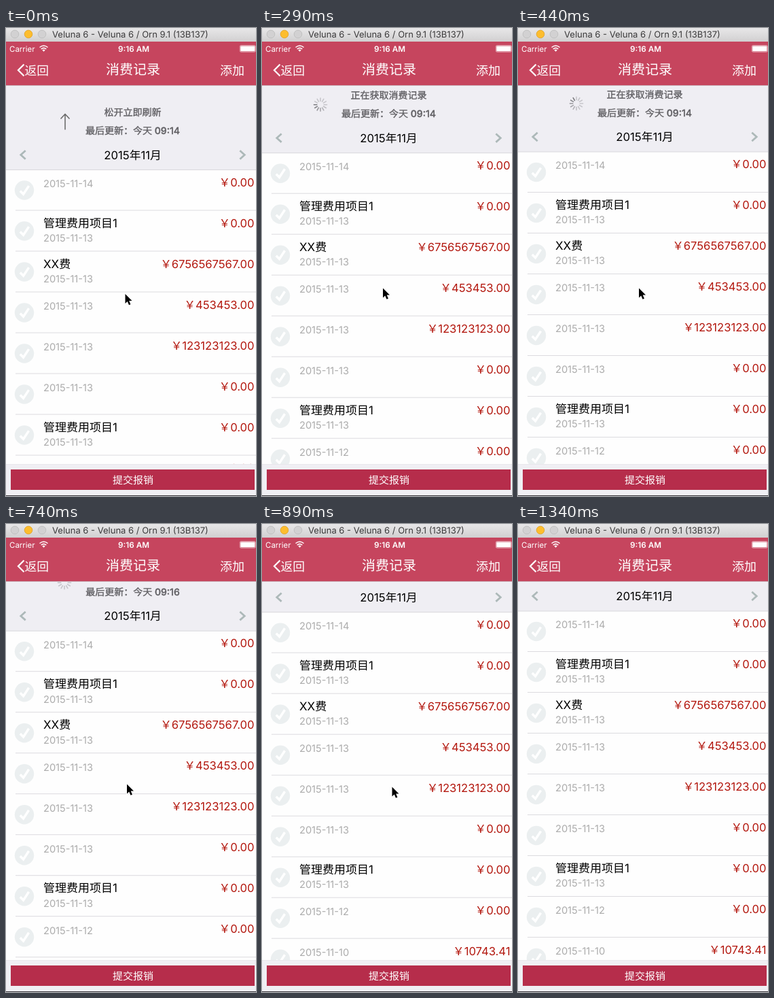
Recreate the animation shown at these times as an HTML page. Size 368 px wide and 688 px high, loop 2350 ms.

```html
<!DOCTYPE html>
<html lang="zh-CN">
<head>
<meta charset="utf-8">
<title>消费记录</title>
<style>
  html, body { margin: 0; width: 100%; height: 100%; overflow: hidden; background: #fff; }
  svg { display: block; width: 100%; height: 100%; }
  text {
    font-family: Inter, "Noto Sans CJK SC", "Noto Sans CJK", sans-serif;
    text-rendering: geometricPrecision;
    white-space: pre;
  }
  .medium { stroke: #5f5e62; stroke-width: .35; }
</style>
</head>
<body>
<svg id="stage" viewBox="0 0 368 688">
  <defs>
    <linearGradient id="chrome" x2="0" y2="1">
      <stop stop-color="#e8e7e8"/><stop offset="1" stop-color="#d1d0d1"/>
    </linearGradient>
    <clipPath id="view"><rect y="84" width="368" height="557"/></clipPath>
  </defs>
  <rect width="368" height="688" fill="#fefefe"/>
  <g clip-path="url(#view)">
    <g id="scroll">
      <rect y="-100" width="368" height="228" fill="#efeef3"/>
      <path d="M0 128H368" stroke="#d8d7dc"/>
      <g fill="none" stroke="#adb9b9" stroke-width="2.8">
        <path d="M28.7 99.8L21.8 106L28.7 112.2M344.3 99.8L351.2 106L344.3 112.2"/>
      </g>
      <path id="arrow" d="M87 69V46M80.5 53L87 46L93.5 53" fill="none" stroke="#666" stroke-width="1.5"/>
      <g id="spinner" transform="translate(86 57)"></g>
    </g>
  </g>
  <g id="bars">
    <rect width="368" height="20" fill="url(#chrome)"/>
    <g stroke-width=".8">
      <circle cx="13" cy="9" r="5.8" fill="#d2d1d2" stroke="#bcbbbc"/>
      <circle cx="33" cy="9" r="5.8" fill="#fdbd2e" stroke="#dfa023"/>
      <circle cx="53" cy="9" r="5.8" fill="#d2d1d2" stroke="#bcbbbc"/>
    </g>
    <rect y="20" width="368" height="64" fill="#c6455e"/>
    <rect y="84" width="368" height="1" fill="#c9a9b3"/>
    <g fill="none" stroke="#fff">
      <path d="M49.5 28.5Q55.5 23.5 61.5 28.5M51.7 31Q55.5 27.8 59.3 31" stroke-width="1.5"/>
      <path d="M26.5 53.5L18 62L26.5 70.5" stroke-width="2.3"/>
      <rect x="344.3" y="25.6" width="23" height="9.6" rx="1.8" stroke-width=".7" opacity=".8"/>
    </g>
    <path d="M53.3 32.4Q55.5 30.6 57.7 32.4L55.5 34.8Z" fill="#fff"/>
    <rect x="345.2" y="26.5" width="21.2" height="7.8" rx="1" fill="#fff"/>
    <rect y="641" width="368" height="47" fill="#f0eff4"/>
    <path d="M0 641.5H368" stroke="#e8e7ec"/>
    <rect x="7" y="649" width="359" height="30" fill="#b62d4b"/>
    <rect y="687" width="368" height="1" fill="#3b383d"/>
  </g>
  <path id="cursor" d="M0 0V14L3.2 11L5.5 16.3L7.9 15.2L5.7 10.1H10Z"
    fill="#000" stroke="#fff" stroke-width="1.8" paint-order="stroke"/>
</svg>
<script>
const byId = id => document.getElementById(id);
const scroll = byId('scroll'), bars = byId('bars'), spinner = byId('spinner');
const arrow = byId('arrow'), cursor = byId('cursor');

function add(parent, tag, attrs) {
  const node = document.createElementNS('http://www.w3.org/2000/svg', tag);
  for (const key in attrs) node.setAttribute(key, attrs[key]);
  return parent.appendChild(node);
}

// Places text by the vertical middle of its glyphs.
function label(parent, text, x, middle, size, fill, anchor = 'start', weight = 400) {
  const node = add(parent, 'text', {
    x, y: middle + size * 0.37, fill,
    'font-size': size, 'text-anchor': anchor, 'font-weight': weight
  });
  node.textContent = text;
  return node;
}

label(bars, 'Veluna 6 - Veluna 6 / Orn 9.1 (13B137)', 68, 9.3, 13, '#3b3a3b');
label(bars, 'Carrier', 5, 30.5, 11.5, '#fff');
label(bars, '9:16 AM', 188, 30.5, 11.7, '#fff', 'middle', 600);
label(bars, '返回', 27.5, 62, 17.8, '#fff');
label(bars, '消费记录', 187, 61, 20, '#fff', 'middle');
label(bars, '添加', 351, 62, 18, '#fff', 'end');
label(bars, '提交报销', 187, 664, 15, '#fff', 'middle');

const status = label(scroll, '', 186.5, 43.5, 14, '#5f5e62', 'middle', 500);
const updated = label(scroll, '', 186.5, 70.5, 14, '#5f5e62', 'middle', 500);
for (const line of [status, updated]) line.classList.add('medium');
label(scroll, '2015年11月', 186.5, 106, 16.7, '#000', 'middle');

const rows = [
  ['', '14', '0.00'],
  ['管理费用项目1', '13', '0.00'],
  ['XX费', '13', '6756567567.00'],
  ['', '13', '453453.00'],
  ['', '13', '123123123.00'],
  ['', '13', '0.00'],
  ['管理费用项目1', '13', '0.00'],
  ['', '12', '0.00'],
  ['', '10', '10743.41']
];
rows.forEach(([name, day, price], i) => {
  const top = 128 + i * 60;
  add(scroll, 'circle', { cx: 27, cy: top + 30, r: 14.2, fill: '#ebeff0' });
  add(scroll, 'path', {
    d: `M20.8 ${top + 31}L25.6 ${top + 35.8}L33.6 ${top + 23.6}`,
    fill: 'none', stroke: '#fff', 'stroke-width': 3.4
  });
  if (name) label(scroll, name, 55, top + 18, 17, '#000');
  label(scroll, '2015-11-' + day, 55, top + (name ? 40 : 20), 14.6, '#acacac');
  label(scroll, '￥' + price, 365.5, top + 18, 16.6, '#b3170e', 'end');
  add(scroll, 'path', { d: `M14 ${top + 59.5}H368`, stroke: '#dcdbdf' });
});

const spokes = Array.from({ length: 12 }, (_, i) => add(spinner, 'path', {
  d: 'M0 -5.2V-9.6', stroke: '#7c7c80', 'stroke-width': 1.6,
  'stroke-linecap': 'round', transform: `rotate(${i * 30})`
}));

const LOOP = 2350;
const PULL = '松开立即刷新', LOAD = '正在获取消费记录', IDLE = '下拉刷新消费记录';
// start, scroll offset, status, minute of last update, pointer position
const steps = [
  [0, 80.5, PULL, '14', 175.5, 391],
  [150, 67.7, LOAD, '14', 177, 385.5],
  [290, 55.7, LOAD, '14', 178, 382.5],
  [440, 54, LOAD, '14', 178, 382.5],
  [590, 54, IDLE, '16', 178, 382.5],
  [740, 29.2, IDLE, '16', 178, 382.5],
  [890, 1.7, IDLE, '16', 191.5, 386.5],
  [1040, 0, IDLE, '16']
];
let shown;

function show(step) {
  const [start, offset, message, minute, x, y] = step;
  scroll.setAttribute('transform', `translate(0 ${offset})`);
  status.textContent = message;
  updated.textContent = '最后更新：今天 09:' + minute;
  arrow.style.display = message === PULL ? '' : 'none';
  spinner.style.display = message === PULL ? 'none' : '';
  const lead = Math.floor(start * 12 / 1000) + 6;
  spokes.forEach((spoke, i) => {
    const age = (lead - i + 24) % 12;
    spoke.setAttribute('opacity', Math.max(0.35, 1 - age * 0.12));
  });
  cursor.style.display = x === undefined ? 'none' : '';
  if (x !== undefined) cursor.setAttribute('transform', `translate(${x} ${y})`);
}

function tick() {
  const time = performance.now() % LOOP;
  const step = steps.filter(s => s[0] <= time).pop();
  if (step !== shown) show(shown = step);
  requestAnimationFrame(tick);
}
tick();
</script>
</body>
</html>
```
